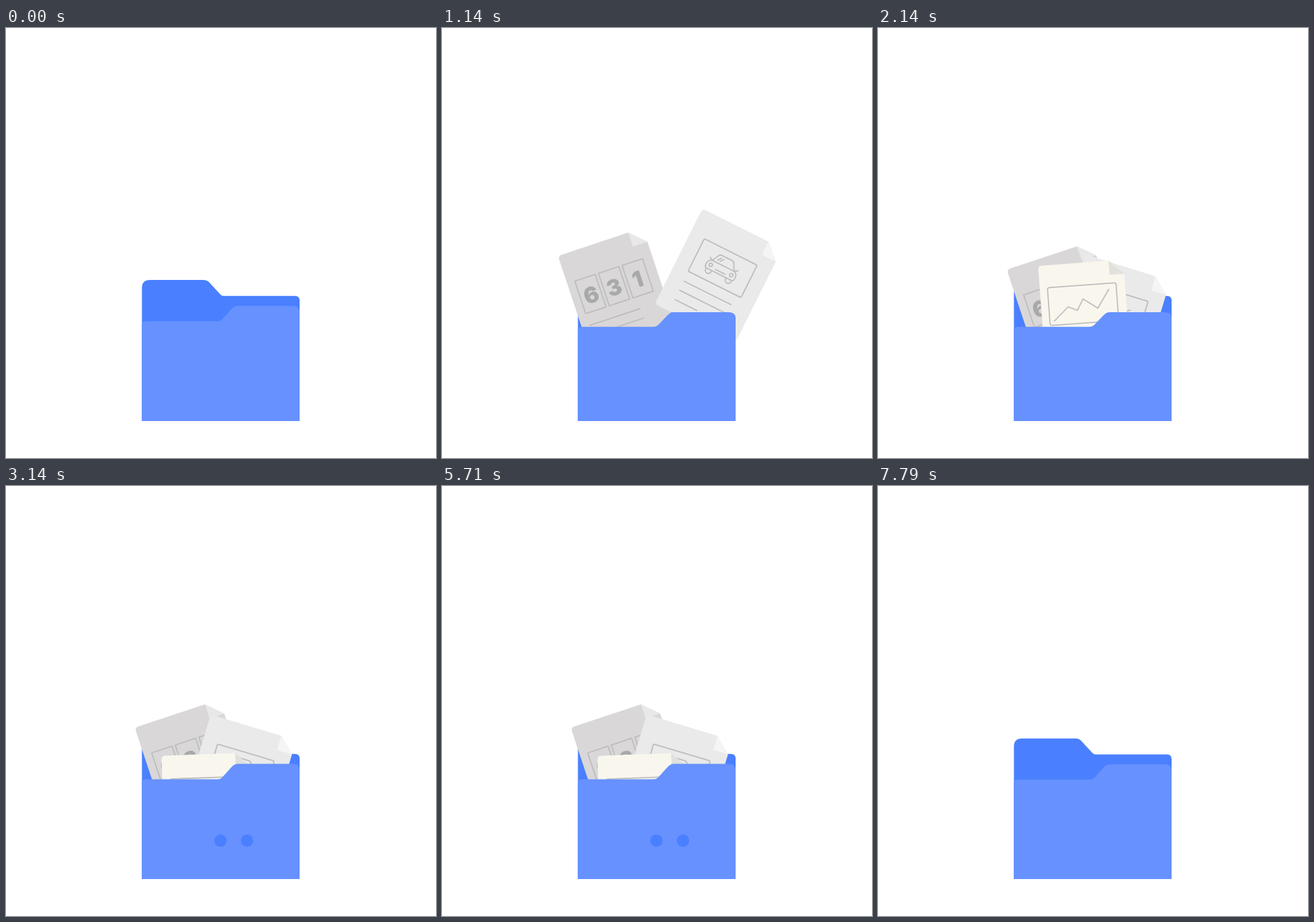
These frames come from a looping animation (640x640 px, 7.87 s). An HTML page:

```html
<!DOCTYPE html>
<html lang="en">
<head>
<meta charset="utf-8">
<title>Folder</title>
<style>
  html, body { margin: 0; width: 100%; height: 100%; overflow: hidden; background: #fff; }
  svg { display: block; width: 100%; height: 100%; }
  .ink { fill: none; stroke: #bdbdbd; stroke-width: 1.8; stroke-linecap: round; stroke-linejoin: round; }
  text { font: 900 33px Inter, sans-serif; fill: #a9a9a9; text-anchor: middle; }
</style>
</head>
<body>
<svg viewBox="0 0 640 640">
  <defs>
    <path id="sheet" d="M6 0H110L133 22V153q0 6-6 6H6q-6 0-6-6V6q0-6 6-6z"/>
    <path id="fold" d="M110 0L133 22H110z"/>
    <path id="lines" d="M13 113H91M13 128H91M13 143.5H49"/>
  </defs>
  <g id="folder">
    <path fill="#4a80ff" d="M202.300 585V387q0-12 12-12H294q5 0 8.500 3.500L319 396.500q2 2.300 5 2.300H430q7 0 7 7V585z"/>
  </g>
  <g class="doc">
    <use href="#sheet" fill="#d9d7d8"/>
    <use href="#fold" fill="#e8e8e8"/>
    <path class="ink" d="M12 43.500h32v51h-32zM49 43.500h32v51h-32zM86 43.500h32v51h-32z"/>
    <use href="#lines" class="ink"/>
    <text x="28.500" y="82.500">6</text><text x="64.500" y="82.500">3</text><text x="101.500" y="82">1</text>
  </g>
  <g class="doc">
    <use href="#sheet" fill="#eaeaea"/>
    <use href="#fold" fill="#f5f5f5"/>
    <rect class="ink" x="22.500" y="39" width="88" height="54" rx="2"/>
    <use href="#lines" class="ink" x="11" y="-4"/>
    <g class="ink" transform="translate(65.500 66.500)">
      <path d="M-18-4L-13-14q1.500-3 5-3H8q3.500 0 5 3L18-4"/>
      <path d="M-18-4H18q6 2 6 7V6q0 4-4 4H-20q-4 0-4-4V3q0-5 6-7z"/>
      <path d="M-18-4l-5-3M18-4l5-3M-8 6H8M-11-8l4-5M-7-8l4-5"/>
      <path d="M-21 10v2a4.500 4.500 0 0 0 9 0v-2M12 10v2a4.500 4.500 0 0 0 9 0v-2"/>
      <circle cx="-17" cy="3" r="2.500"/><circle cx="17" cy="3" r="2.500"/>
    </g>
  </g>
  <g class="doc">
    <use href="#sheet" fill="#f9f6ee"/>
    <use href="#fold" fill="#e1e0dc"/>
    <rect class="ink" x="12" y="35" width="107" height="59" rx="3"/>
    <path class="ink" d="M19 87.500L42 67L56 73.500L66 56.500L88 72.500L107 44.500"/>
    <use href="#lines" class="ink"/>
  </g>
  <g id="front">
    <path fill="#6691ff" d="M202 585V442.500q0-6 6-6H315q4 0 6.500-2.500L336 418q4-4.500 9-4.500H426q11 0 11 9V585z"/>
    <g fill="#4a80ff">
      <circle class="dot" cx="358.700" cy="527.800" r="9.200"/>
      <circle class="dot" cx="319.200" cy="527.800" r="9.200"/>
      <circle class="dot" cx="280" cy="527.800" r="9.200"/>
    </g>
  </g>
</svg>
<script>
const LOOP = 7870, FLOOR = 585, FLY = 1800;
const all = s => [...document.querySelectorAll(s)];
const folder = document.getElementById('folder'), front = document.getElementById('front');
const docs = all('.doc'), dots = all('.dot');

// rest: centre and angle; from: entry offset, turn and scale; hop and drop: exit offsets
const poses = [
  { start: 390, rest: [279.9, 414.2, -18.4], from: [-121, -130, 0, 1], hop: [-12, -21], drop: [30, 127] },
  { start: 780, rest: [345.4, 435.4, 16.7], from: [148, -147, 22, 1], hop: [21, -21], drop: [-11, 121] },
  { start: 1405, rest: [300.5, 478.7, -2.1], from: [41, -326, -12.8, .731], hop: [0, -21], drop: [10, 49] }
];
const dotTimes = [2790, 3070, 3500, 3860, 4070, 4360, 4790, 5140, 5360, 5710];

const part = (t, a, b) => Math.min(1, Math.max(0, (t - a) / (b - a)));
const smooth = x => x * x * (3 - 2 * x);
const mix = (a, b, k) => a + (b - a) * k;

// cubic-bezier(.2, .5, .2, 1)
function glide(x) {
  const curve = (s, a, b) => 3 * (1 - s) ** 2 * s * a + 3 * (1 - s) * s * s * b + s ** 3;
  let lo = 0, hi = 1;
  for (let i = 0; i < 22; i++) {
    const mid = (lo + hi) / 2;
    if (curve(mid, .2, .2) < x) lo = mid; else hi = mid;
  }
  return curve(lo, .5, 1);
}

function placeDoc(el, p, t) {
  const left = 1 - glide(part(t, p.start, p.start + FLY));
  const rise = Math.sin(part(t, 5820, 6130) * Math.PI / 2);
  const fall = part(t, 6130, 6680) ** 2;
  const [x, y] = [0, 1].map(i => p.rest[i] + p.from[i] * left + mix(p.hop[i] * rise, p.drop[i], fall));
  const angle = p.rest[2] + p.from[2] * left;
  const scale = mix(1, p.from[3], left) * (1 - .265 * fall);
  el.setAttribute('transform', `translate(${x} ${y}) rotate(${angle}) scale(${scale}) translate(-66.5 -79.5)`);
  el.setAttribute('opacity', t < 6680 ? part(t, p.start, p.start + 80) : 0);
}

function squash(t) {
  if (t < 6580) return 1 - .045 * smooth(part(t, 6250, 6550));
  const d = t - 6580;
  return 1 - .045 * Math.exp(-d / 510) * Math.cos(Math.PI * d / 595);
}

const stretch = (el, k) => el.setAttribute('transform', `translate(0 ${FLOOR * (1 - k)}) scale(1 ${k})`);

function draw(t) {
  const body = squash(t);
  const open = smooth(part(t, 100, 480)) - smooth(part(t, 2600, 3000));
  stretch(folder, body);
  stretch(front, body * (1 - .055 * open));
  docs.forEach((el, i) => placeDoc(el, poses[i], t));
  const lit = t < 5860 ? dotTimes.filter(d => d <= t).length % 4 : 0;
  dots.forEach((el, i) => el.setAttribute('opacity', i < lit ? 1 : 0));
}

const begin = performance.now();
function tick() {
  draw((performance.now() - begin) % LOOP);
  requestAnimationFrame(tick);
}
tick();
</script>
</body>
</html>
```
